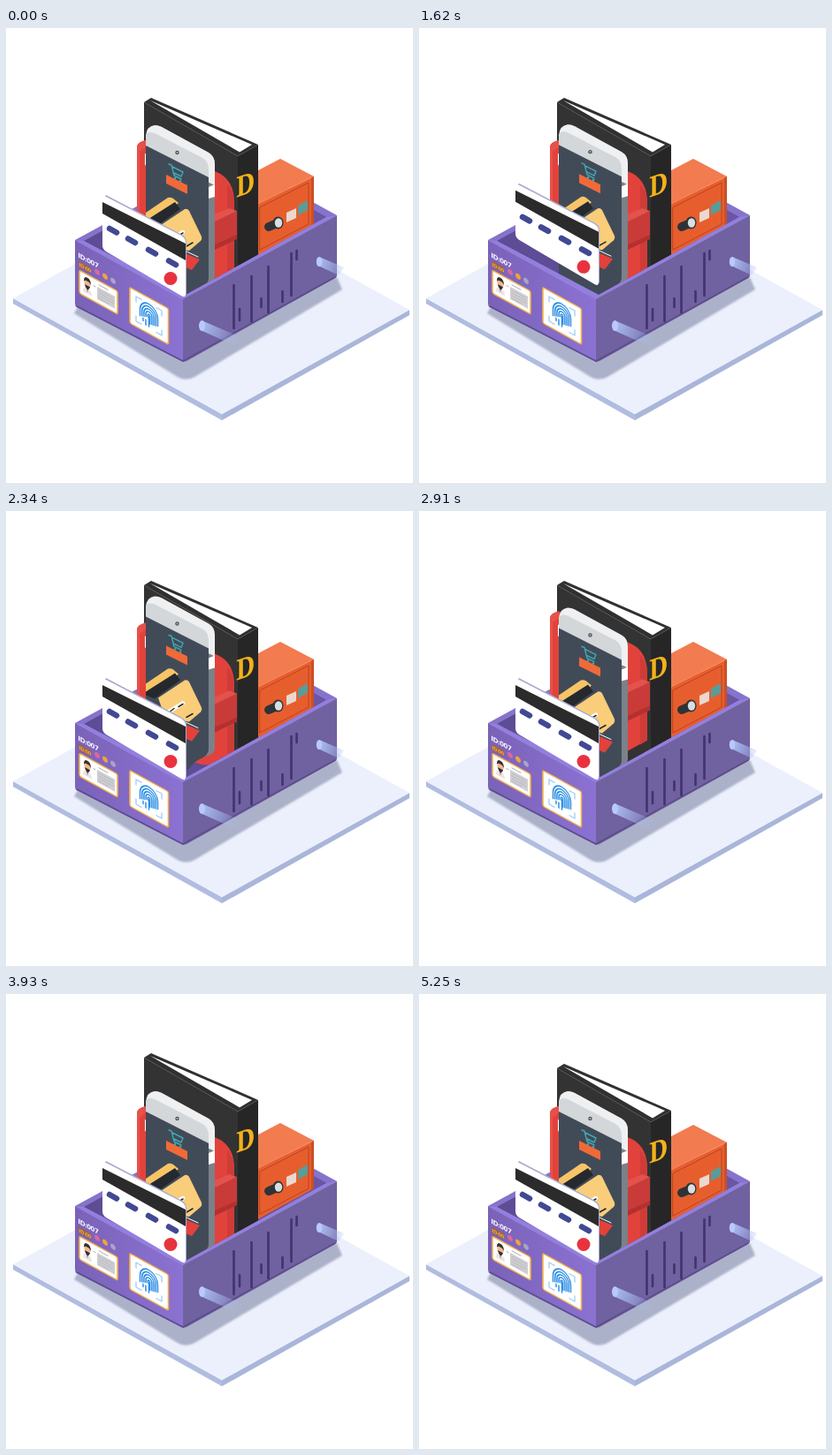
These frames come from a looping animation (460x515 px, 7.5 s). An HTML page:

```html
<!DOCTYPE html>
<html lang="en">
<head>
<meta charset="utf-8">
<style>
html, body { margin: 0; width: 100%; height: 100%; overflow: hidden; background: #fff; }
svg { display: block; width: 460px; height: 515px; }
text { font-family: Lato, "Open Sans", sans-serif; font-weight: 900; }
.line { fill: none; stroke-linecap: round; stroke-linejoin: round; }
</style>
</head>
<body>
<svg viewBox="0 0 460 515">
  <defs>
    <linearGradient id="beamA" gradientUnits="userSpaceOnUse" x1="221" y1="337" x2="266" y2="357">
      <stop offset="0" stop-color="#a9bdf2"/><stop offset="1" stop-color="#a9bdf2" stop-opacity="0"/>
    </linearGradient>
    <linearGradient id="beamB" gradientUnits="userSpaceOnUse" x1="354" y1="265" x2="384" y2="276">
      <stop offset="0" stop-color="#a9bdf2"/><stop offset="1" stop-color="#a9bdf2" stop-opacity=".15"/>
    </linearGradient>
    <linearGradient id="front" x1="0" x2="1">
      <stop offset="0" stop-color="#7a62b8"/><stop offset="1" stop-color="#8b72d2"/>
    </linearGradient>
    <filter id="soft" x="-10%" y="-10%" width="120%" height="120%"><feGaussianBlur stdDeviation="1"/></filter>
    <clipPath id="inside"><path d="M0 0H460V160L203 302 88 241 0 194Z"/></clipPath>
  </defs>

  <!-- platform -->
  <path fill="#b0bde0" d="M8 306 244 437V444L8 312Z"/>
  <path fill="#a9b6da" d="M244 437 456 319V325L244 444Z"/>
  <path fill="#ecf0fd" d="M8 306 220 188 456 319 244 437Z"/>
  <path fill="#abb1c8" filter="url(#soft)" d="M82 314 77 323 194 395Q203 400 213 395L380 296 374 282Z"/>

  <!-- box rim and interior -->
  <path fill="#8673cb" d="M78 240 252 145 374 212 200 307Z"/>
  <path fill="#5e4c94" d="M88 241 250 152 362 214 203 302Z"/>
  <path fill="#6a56a3" d="M250 152 362 214 320 238 250 200Z"/>

  <g clip-path="url(#inside)">
    <g class="item">
      <!-- safe -->
      <path fill="#f27b50" d="M270 169 310 148 348 168 285 199 270 190Z"/>
      <path fill="#e75e2e" d="M285 199 348 168V222L285 257Z"/>
      <path fill="#cb4f26" d="M345 169 348 168V222L345 224Z"/>
      <path class="line" stroke="#b9441d" d="M287 203 342 175V222L287 251Z"/>
      <path class="line" stroke="#fa8c62" d="M285 199 347 168"/>
      <path class="line" stroke="#2e3338" stroke-width="10" d="M297 225 304 222"/>
      <ellipse cx="307.500" cy="220.500" rx="6" ry="7" fill="#2e3338"/>
      <ellipse cx="308" cy="220.500" rx="4.200" ry="5.200" fill="#d8dfe1"/>
      <path fill="#ead9cf" d="M317 209 328 204V215L317 220Z"/>
      <path fill="#5a9c98" d="M330 201 341 195V206L330 212Z"/>
    </g>
    <g class="item">
      <!-- book -->
      <path fill="#333" d="M156 84 262 145V300L156 240Z"/>
      <path fill="#262626" d="M262 145 285 132V300H262Z"/>
      <path fill="#303030" d="M156 84 164 79 285 132 262 145Z"/>
      <path fill="#fff" d="M163 82 278 132 264 140.500Z"/>
      <text transform="matrix(.87 -.3 0 1 260 192)" style="font:bold 32px 'Noto Serif',serif" fill="#f3b21b">D</text>
    </g>
    <g class="item">
      <!-- backpack -->
      <path fill="#e2423c" d="M148 134Q149 129 158 127L226 160Q257 164 258 196V273L236 285Q224 291 212 284L148 240Z"/>
      <path fill="#e8504a" d="M148 134Q149 129 158 127V134L151 140V230L148 228Z"/>
      <path fill="#cf3c38" d="M250 177Q257 184 258 196V273L250 278Z"/>
      <path fill="#c83b39" d="M234 217 261 207V237L234 250Z"/>
      <path fill="#e2534d" d="M234 212 252 204 261 207 234 220Z"/>
      <path fill="#b3302f" d="M234 246 261 234V239L234 252Z"/>
      <path fill="#fff" d="M157 142 159 143V156L157 155Z"/>
    </g>
    <g class="item">
      <!-- phone -->
      <path fill="#7b818a" d="M165 112Q168 109 174 111L229 141Q236 145 236 154V281Q236 288 229 290L222 293H165Z"/>
      <path fill="#eef0f1" d="M158 122Q159 111 168 110Q172 110 176 112L229 141Q236 145 236 154V178L158 142Z"/>
      <path fill="#d3d7d9" d="M158 123Q159 116 168 119L222 147Q229 151 229 160V172L158 135Z"/>
      <path fill="#414b58" d="M158 133 229 169V284Q228 290 222 293 212 297 206 306L158 310Z"/>
      <path fill="#fff" d="M229 180 236 177V191L229 193Z"/>
      <circle cx="193.500" cy="141" r="2.200" fill="#4a525b"/><circle cx="193.500" cy="141" r=".9" fill="#b9c2c8"/>
      <path class="line" stroke="#3fa7b3" stroke-width="1.400" d="M184 154 187 155 190 167 198 171M188 157 200 163 198 168 190 164"/>
      <circle cx="191" cy="170" r="1.300" fill="#3fa7b3"/><circle cx="197" cy="173" r="1.300" fill="#3fa7b3"/>
      <path fill="#f06a38" d="M181 166 205 178V188L181 176Z"/>
      <path fill="#f7c467" d="M158 209 183 192Q186 191 189 193L195 198 166 222 158 219Z"/>
      <path fill="#25292e" d="M158 218 191 197 197 205 168 226 158 222Z"/>
      <path fill="#f9cd79" d="M172 225 202 205Q205 204 207 207L221 236Q222 239 220 241L207 252 180 248Z"/>
      <path class="line" stroke="#fff" stroke-width="4.500" d="M185 240 200 231"/>
      <path class="line" stroke="#25292e" stroke-width="1.500" d="M186 240 190 237M195 235 200 232M204 247 211 243"/>
      <path fill="#e4413b" d="M198 253 219 262 210 274 198 269Z"/>
      <path class="line" stroke="#fff" d="M204 253 217 259"/>
    </g>
  </g>

  <!-- box walls -->
  <path fill="#937fdf" d="M78 240 88 241 203 302 362 214 374 212 200 307Z"/>
  <path fill="url(#front)" d="M78 240 200 307V378L80 316Q78 315 78 312Z"/>
  <path fill="#7061a0" d="M200 307 374 212V280Q374 282 372 283L204 377 200 378Z"/>
  <path class="line" stroke="#5b4b8d" stroke-width="1.500" d="M80 315 200 377 372 282"/>

  <g transform="matrix(1 .55 0 1 78 240)">
    <text x="3.500" y="17.500" font-size="7.500" fill="#fff">ID:007</text>
    <rect x="4" y="21" width="14" height="7" rx="1" fill="#9a6355"/>
    <text x="4.500" y="27" font-size="5.500" fill="#f9a92e">ID:00</text>
    <circle cx="25" cy="22.500" r="3" fill="#e0679c"/>
    <circle cx="34" cy="22.500" r="3" fill="#f2a33a"/>
    <circle cx="43" cy="22.500" r="3" fill="#aaa5c3"/>
    <g fill="#fff" stroke="#f3b04d" stroke-width="1.600">
      <rect x="5" y="31.500" width="43" height="26" rx="2"/>
      <rect x="62" y="19.500" width="43.500" height="40.500" rx="2"/>
    </g>
    <path fill="#e6e6ea" d="M9 53Q9 47 14 47T19 53Z"/>
    <path fill="#d84c48" d="M13 47H15L14 52Z"/>
    <ellipse cx="14" cy="41.500" rx="3.500" ry="5" fill="#f0b78f"/>
    <path fill="#33302f" d="M10 41Q10 35 14 35T18 41L16 39H12ZM11 44H17Q16 48 14 48T11 44Z"/>
    <path class="line" stroke="#a9a9b2" d="M21 40H23M27 36H37"/>
    <rect x="25" y="39" width="20" height="14" fill="#cfcfd3"/>
    <path class="line" stroke="#b4b4bb" stroke-width=".7" d="M27 42H43M27 45H43M27 48H43M27 51H38"/>
    <path class="line" stroke="#9cccf7" stroke-width="1.300" d="M69 32V26H75M92 26H98V32M98 48V54H92M75 54H69V48"/>
    <g id="print" class="line" stroke="#2d8fe6" stroke-width="1.500"></g>
  </g>

  <path class="line" stroke="#42326f" stroke-width="2.600"
    d="M257.500 291V340M264 318V331M277.500 281V332M288.500 306V316M296.500 270V322M312.500 298V310M322.500 255V303M328.500 252V262"/>
  <path fill="url(#beamA)" d="M221 331 272 353 262 361 222 343Z"/>
  <ellipse cx="221.500" cy="337" rx="3.500" ry="6" fill="#b9caf8"/>
  <path fill="url(#beamB)" d="M354 259 382 271 376 280 355 270Z"/>
  <ellipse cx="354" cy="264.500" rx="3.200" ry="5.500" fill="#b9caf8"/>

  <g class="item">
    <!-- payment card -->
    <path fill="#a9acd0" d="M110 194 113 189 199 234Q204 237 204 242V302L200 300Z"/>
    <path fill="#fff" d="M109 195Q109 190 113 191L198 235Q203 238 203 243V301Q203 306 198 303L113 253Q109 250 109 246Z"/>
    <path fill="#2b2b2c" d="M109 197 203 244V263L109 210Z"/>
    <path class="line" stroke="#414994" stroke-width="6.500"
      d="M117 227 125 231.500M138 238.500 146 243M161 251 169 255.500M184 263.500 192 268"/>
    <circle cx="186" cy="283.500" r="7.500" fill="#e8333f"/>
  </g>
</svg>
<script>
const LOOP = 7500, STEP = 30, STAGGER = 750, HOP = 1500, HEIGHT = 14;
// Drawn back to front, lifted front to back.
const items = [...document.querySelectorAll('.item')].reverse();

const ridge = r => `M${83.5 - r} ${41 + r * .4}V${40 - r * .2}A${r} ${r * 1.15} 0 0 1 ${83.5 + r} ${40 - r * .2}V${49 - r * .3}`;
document.getElementById('print').innerHTML =
  [1.2, 3.4, 5.6, 7.8, 10].map(r => `<path d="${ridge(r)}"/>`).join('') +
  '<path d="M83.500 41V52M80 46V52M77 46V49"/>';

function draw(now) {
  const t = Math.floor(now % LOOP / STEP) * STEP;
  items.forEach((item, i) => {
    const p = Math.min(1, Math.max(0, (t - (i + 1) * STAGGER) / HOP));
    item.setAttribute('transform', `translate(0 ${-HEIGHT * Math.sin(Math.PI * p) ** 2})`);
  });
  requestAnimationFrame(draw);
}
draw(0);
</script>
</body>
</html>
```
